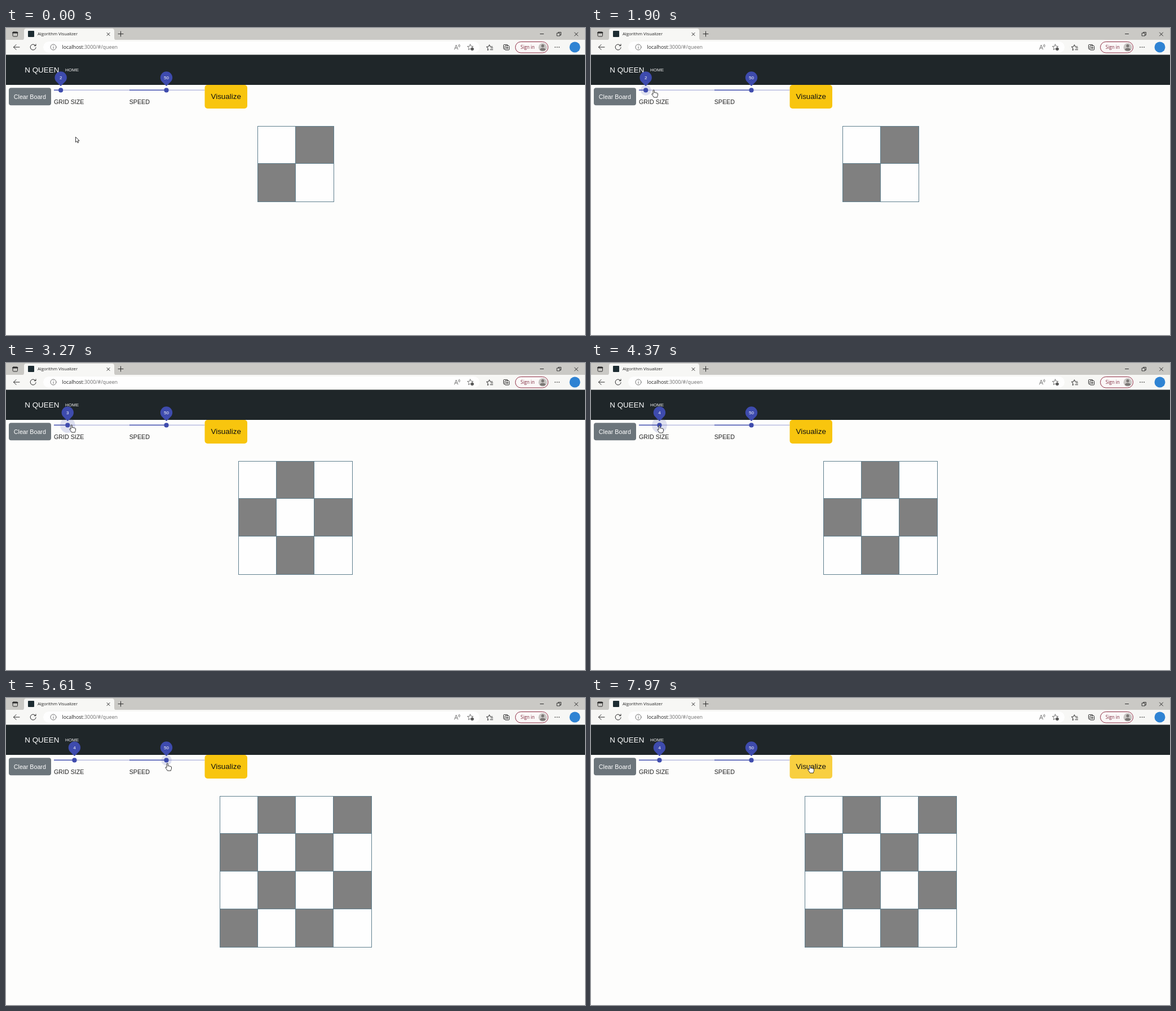
An HTML page that plays this animation: 1027 px wide and 545 px high, repeating every 8 s.

```html
<!DOCTYPE html>
<html lang="en">
<head>
<meta charset="utf-8">
<title>N Queen</title>
<style>
  html, body { margin: 0; width: 100%; height: 100%; overflow: hidden; background: #fdfdfc; }
  svg { display: block; width: 100%; height: 100%; }
  text { font-family: "Liberation Sans", Arial, sans-serif; white-space: pre; }
  .ui text { font-family: "Open Sans", "Noto Sans", sans-serif; fill: #222; }
  .icon { fill: none; stroke: #2b2b2b; stroke-width: 1; stroke-linecap: round; stroke-linejoin: round; }
</style>
</head>
<body>
<svg viewBox="0 0 1027 545">
  <rect width="1027" height="545" fill="#fdfdfc"/>

  <g class="ui">
    <rect width="1027" height="22" fill="#cac9c5"/>
    <rect y="21" width="1027" height="27" fill="#f7f7f5"/>
    <path d="M28 21.5q4 0 4-4V5q0-4 4-4h152q4 0 4 4v12.500q0 4 4 4z" fill="#f7f7f5"/>
    <rect x="66" y="24" width="774" height="20" rx="10" fill="#fefefe"/>
    <rect x="39" y="5" width="11" height="11" rx="1" fill="#1d2c32"/>
    <text x="56" y="13.400" font-size="7.650">Algorithm Visualizer</text>
    <text x="99.500" y="37.300" font-size="8.900">localhost<tspan fill="#6a6a6a">:3000/#/queen</tspan></text>
    <rect x="903.500" y="24.500" width="58" height="19.500" rx="9.750" fill="#fbf8f8" stroke="#8f2f45"/>
    <text x="912.800" y="37" font-size="8.100" style="fill:#7d2439">Sign in</text>
    <circle cx="952" cy="34.300" r="7.500" fill="#c9c6c4"/>
    <circle cx="952" cy="31.700" r="2.600" fill="#7b7775"/>
    <path d="M947 39q0-3.500 5-3.500t5 3.500q-5 3-10 0z" fill="#7b7775"/>
    <circle cx="1009" cy="34" r="9.500" fill="#2f83d3"/>

    <g class="icon">
      <rect x="12" y="7" width="8.500" height="8" rx="1.500"/>
      <path d="M12.500 8.300h7.500" stroke-width="2.500"/>
      <path d="M179 8.500l5 5m0-5l-5 5M199 10.500h9m-4.500-4.500v9"/>
      <path d="M947.500 10.500h6M1008.500 8l6 6m0-6l-6 6"/>
      <path d="M977.500 9h5v5h-5zM979.500 9v-1.500h5v5h-2" stroke-width=".9"/>
      <path d="M24 34H13.500m4.500-4.500L13.500 34l4.500 4.500"/>
      <path d="M52.300 31.200a5 5 0 1 0 .8 3.500M53 28.800v2.800h-2.800"/>
      <g stroke="#666" stroke-width=".9">
        <circle cx="84" cy="34" r="5"/><path d="M84 33.500v3M84 31.400v.1"/>
        <path d="M795.500 38l3-8 3 8m-5-2.500h4M802.500 30q1.200 1.500 0 3M804.300 29q2 2.500 0 5"/>
        <path id="star" d="M823.500 29l1.500 3.300 3.600.3-2.700 2.500.8 3.600-3.200-1.800-3.200 1.800.8-3.600-2.700-2.500 3.600-.3z"/>
        <circle cx="827" cy="37.300" r="2.500" fill="#555"/>
      </g>
      <path d="M856 38.500l-1.800 1 .7-3.600-2.700-2.500 3.700-.4 1.500-3.300 1.500 3.300h4M860 35.500h3.500m-4.500 3h4.500"/>
      <path d="M884.500 37.500h-1q-1 0-1-1v-6q0-1 1-1h5.500q1 0 1 1M885 32.500q0-1 1-1h5.500q1 0 1 1v5.500q0 1-1 1H886q-1 0-1-1zM888.800 33.200v4m-2-2h4"/>
      <path d="M974 34h.1m3.400 0h.1m3.400 0h.1" stroke-width="1.700"/>
    </g>
  </g>

  <rect y="47.500" width="1027" height="53.500" fill="#1f2629"/>
  <text x="33.300" y="78.700" font-size="13.400" fill="#fff">N QUEEN</text>
  <text x="105" y="76.900" font-size="8.040" fill="#eee">HOME</text>

  <rect x="5" y="106.300" width="75" height="31" rx="4" fill="#6c757b"/>
  <text x="13.800" y="125.600" font-size="10.700" fill="#fff">Clear Board</text>
  <text x="85" y="134.600" font-size="10.700" fill="#222">GRID SIZE</text>
  <text x="218.700" y="134.600" font-size="10.700" fill="#222">SPEED</text>

  <g id="sliders"></g>
  <rect id="button" x="352.500" y="101" width="75.500" height="42" rx="5"/>
  <text x="363.500" y="126.300" font-size="13.400" fill="#111">Visualize</text>
  <g id="board" shape-rendering="crispEdges"></g>

  <g id="cursor" fill="#fff" stroke="#222" stroke-width=".9" stroke-linejoin="round">
    <path id="arrow" d="M.5.5v9.300l2.200-2 1.500 3.200 1.500-.7L4.300 7.100h2.900z"/>
    <path id="hand" d="M-.9 1Q-.8-.1.200-.1T1.300 1v4.100q.2-.9 1.200-.8t1 1q.3-.7 1.200-.5t.9 1.100q.3-.5 1.100-.3t.8 1.200v2.300q0 1.400-1.100 2.800v1.200H.4Q-.4 11.300-2.800 8.300-3.500 7.300-2.800 6.800t1.900.7z"/>
  </g>
</svg>

<script>
const LOOP = 8000;
const $ = id => document.getElementById(id);

// Keys are [time, value, ...]; values ease between neighbouring keys.
const CURSOR = [
  [570, 123, 193], [1250, 112, 112], [1600, 111, 110], [2700, 111, 110], [3270, 116, 110],
  [4100, 121, 111], [4450, 121, 111], [5400, 286, 116], [5750, 286, 116], [6450, 384, 120],
  [6840, 384, 120], [7210, 386, 120], [7640, 386, 120], [7900, 388, 120]
];
const HOVER = 9.4, PRESS = 13.4;
const GRID_HALO = [
  [1150, 0], [1300, HOVER], [1940, HOVER], [2060, PRESS], [2200, HOVER], [2850, HOVER],
  [3000, PRESS], [4400, PRESS], [4550, HOVER], [4680, HOVER], [4830, 0]
];
const SPEED_HALO = [[5120, 0], [5270, HOVER], [5880, HOVER], [6030, 0]];
const BUTTON = [
  [6230, 248, 197, 14], [6380, 251, 203, 45], [7800, 251, 203, 45], [7950, 248, 207, 64]
];

function sample(keys, t) {
  if (t <= keys[0][0]) return keys[0].slice(1);
  const i = keys.findIndex(key => key[0] > t);
  if (i < 0) return keys.at(-1).slice(1);
  const [start, ...from] = keys[i - 1], [end, ...to] = keys[i];
  const p = (t - start) / (end - start), ease = p * p * (3 - 2 * p);
  return from.map((v, k) => v + (to[k] - v) * ease);
}

function slider(x, pos, value, halo) {
  const blue = '#3e4bad';
  return `<rect x="${x}" y="109.6" width="133.700" height="1.4" fill="#b5b8df"/>
    <rect x="${x}" y="109.6" width="${pos - x}" height="1.4" fill="${blue}"/>
    <circle cx="${pos}" cy="110.4" r="${halo}" fill="${blue}" fill-opacity=".16"/>
    <circle cx="${pos}" cy="110.4" r="4.100" fill="${blue}"/>
    <path transform="translate(${pos} 88) rotate(-45)" fill="${blue}"
      d="M-10.700 10.700V0A10.700 10.700 0 1 1 0 10.700z"/>
    <text x="${pos}" y="90.700" font-size="8.040" fill="#fff" text-anchor="middle">${value}</text>`;
}

function board(n) {
  const left = Math.floor(513 - 33.5 * n) + (n === 2 ? 0 : 0), top = 174, side = 67 * n;
  let svg = '', lines = '';
  for (let r = 0; r < n; r++)
    for (let c = 0; c < n; c++)
      svg += `<rect x="${left + 67 * c}" y="${top + 67 * r}" width="68" height="67"
        fill="${(r + c) % 2 ? '#808080' : '#fefefe'}"/>`;
  for (let i = 0; i <= n; i++) {
    const x = left + 67 * i + (i === n) + .5;
    const y = top + 67 * i - (i > 0 && i < n) + .5;
    lines += `M${x} ${top}v${side + 1}M${left} ${y}h${side + 2}`;
  }
  return svg + `<path d="${lines}" fill="none" stroke="#5f7f8e"/>`;
}

let shownSize = 0;
function draw(now) {
  const t = now % LOOP;
  const value = t < 1940 ? 2 : t < 3950 ? 3 : 4;
  const size = t < 2060 ? 2 : t < 4400 ? 3 : 4;
  const [x, y] = sample(CURSOR, t);
  const pointing = y < 119 || x > 352.5;

  $('sliders').innerHTML =
    slider(85, 85 + (value - 1) * 12.15, value, sample(GRID_HALO, t)[0]) +
    slider(218.8, 284.5, 50, sample(SPEED_HALO, t)[0]);
  if (size !== shownSize) $('board').innerHTML = board(shownSize = size);
  $('button').setAttribute('fill', `rgb(${sample(BUTTON, t).map(Math.round)})`);
  $('cursor').setAttribute('transform', `translate(${x} ${y})`);
  $('hand').style.display = pointing ? '' : 'none';
  $('arrow').style.display = pointing ? 'none' : '';
  requestAnimationFrame(draw);
}
draw(performance.now());
</script>
</body>
</html>
```
